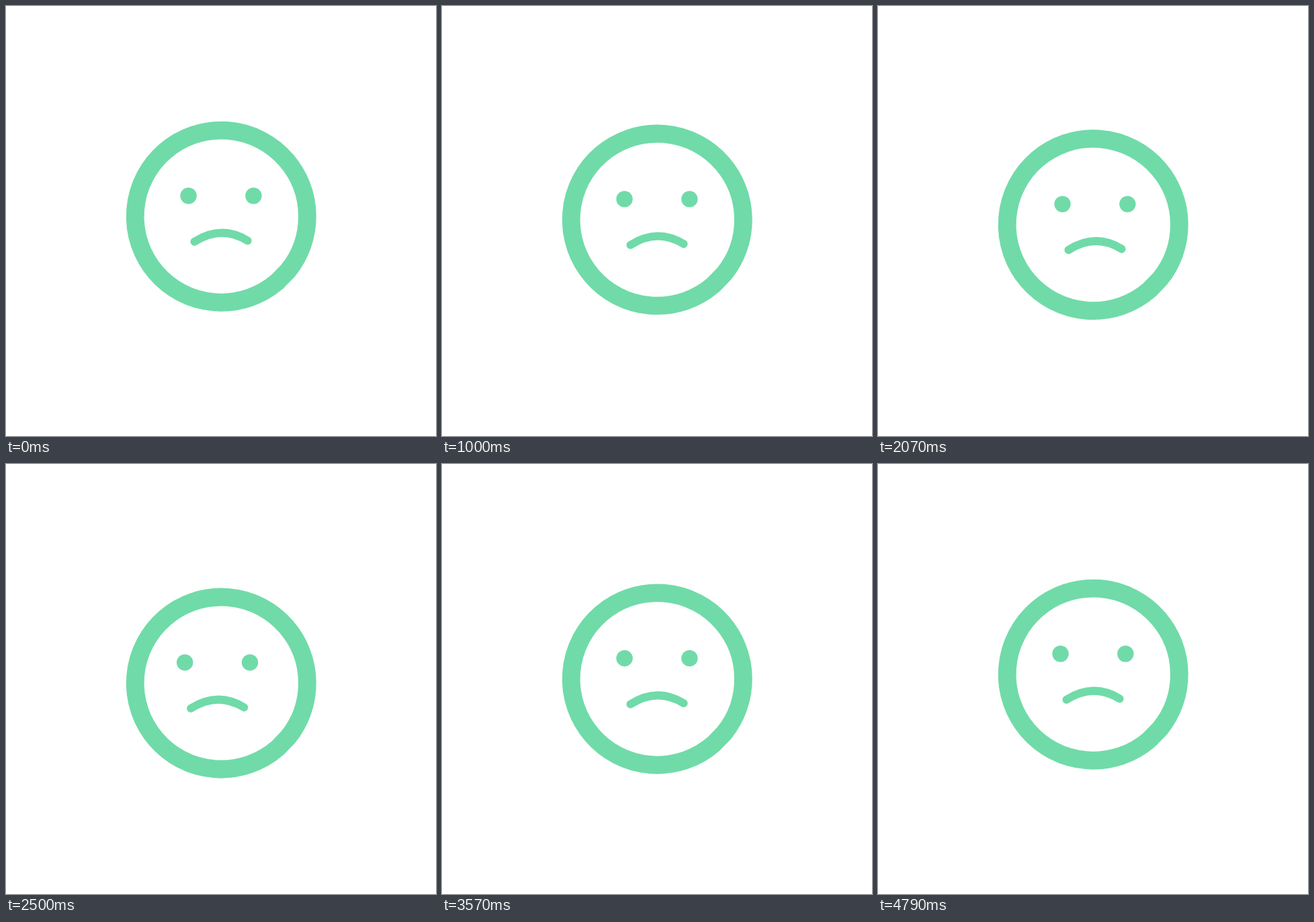
Recreate the animation shown at these times as an HTML page with a canvas. Size 640 by 640 pixels, loop 4.87 s.

```html
<!DOCTYPE html>
<html lang="en">
<head>
<meta charset="utf-8">
<title>Sad face</title>
<style>
  html, body { margin: 0; width: 100%; height: 100%; overflow: hidden; background: #fff; }
  canvas { display: block; width: 640px; height: 640px; }
</style>
</head>
<body>
<canvas id="stage" width="640" height="640"></canvas>
<script>
const ctx = document.getElementById('stage').getContext('2d');
const LOOP = 4870;
const FRAME = 1000 / 14;
const COLOR = '#70dba8';

// Each key is [time in ms, offset in px].
const BOB = [[0, 0], [2400, 13], [4800, 0]];
const SWAY = [[1200, 0], [1750, 9.6], [2450, -5.5], [3140, 1.4], [3600, 0]];

const smooth = s => s * s * (3 - 2 * s);

function valueAt(keys, t) {
  if (t <= keys[0][0]) return keys[0][1];
  for (let i = 1; i < keys.length; i++) {
    const [t0, v0] = keys[i - 1];
    const [t1, v1] = keys[i];
    if (t <= t1) return v0 + (v1 - v0) * smooth((t - t0) / (t1 - t0));
  }
  return keys[keys.length - 1][1];
}

function drawRing() {
  // A short straight chord closes the ring at its lower right.
  ctx.lineWidth = 26.8;
  ctx.beginPath();
  ctx.arc(0, 0, 128.1, 0.86, 0.68 + 2 * Math.PI);
  ctx.closePath();
  ctx.stroke();
}

function drawEye(x) {
  ctx.beginPath();
  ctx.arc(x, -30.7, 12.2, 0, 2 * Math.PI);
  ctx.fill();
}

function drawMouth() {
  ctx.lineWidth = 12;
  ctx.lineCap = 'round';
  ctx.beginPath();
  ctx.moveTo(-39.8, 37.6);
  ctx.quadraticCurveTo(0.3, 12, 39.4, 36.1);
  ctx.stroke();
}

function draw(t) {
  ctx.fillStyle = '#fff';
  ctx.fillRect(0, 0, 640, 640);
  ctx.fillStyle = ctx.strokeStyle = COLOR;
  ctx.save();
  ctx.translate(320.3, 313.2 + valueAt(BOB, t));
  drawRing();
  ctx.translate(valueAt(SWAY, t), 0);
  drawEye(-48.7);
  drawEye(48.1);
  drawMouth();
  ctx.restore();
}

const start = performance.now();

function tick() {
  const t = (performance.now() - start) % LOOP;
  draw(Math.floor((t + 5) / FRAME) * FRAME);
  requestAnimationFrame(tick);
}

tick();
</script>
</body>
</html>
```
